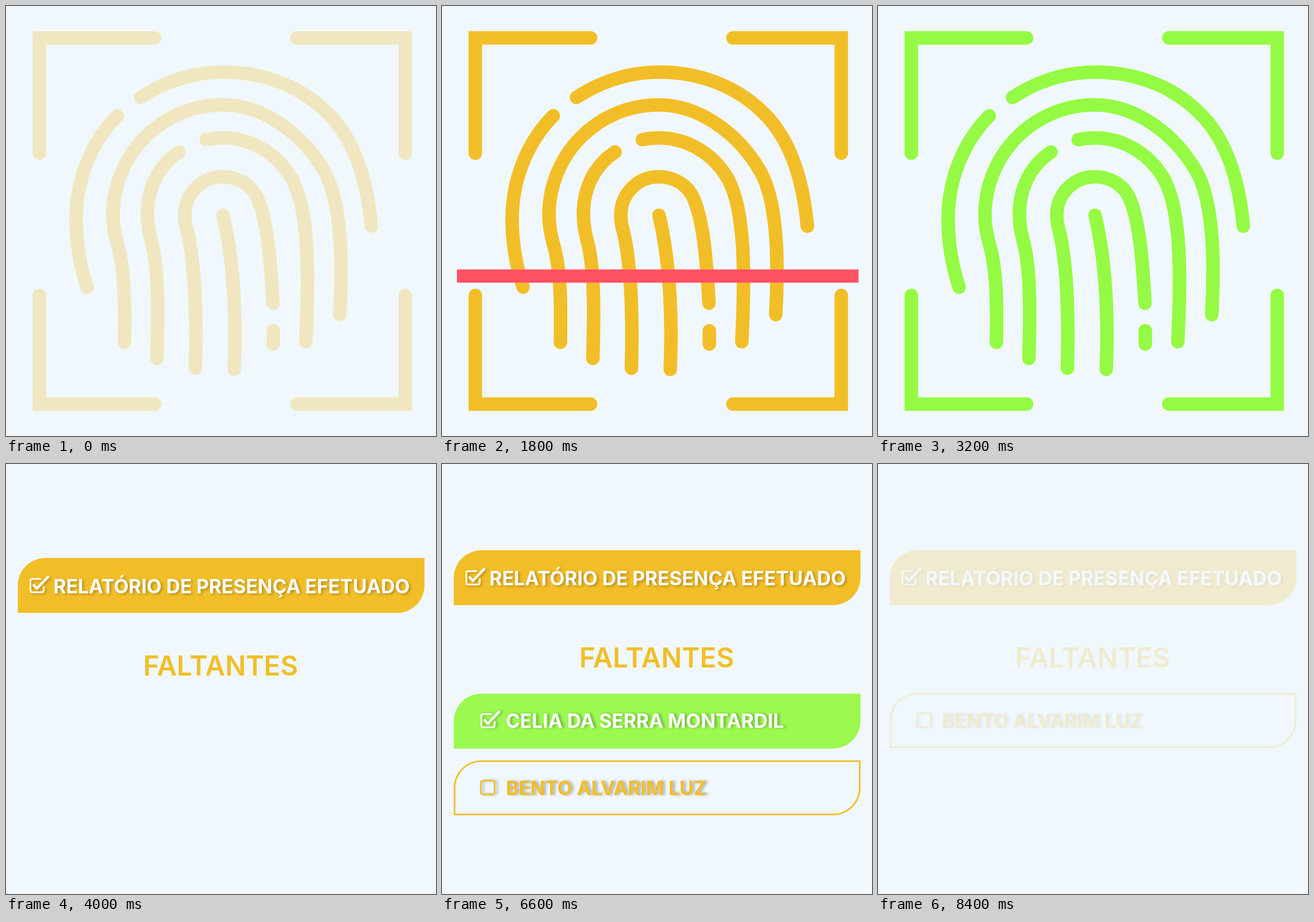
Write an HTML page that moves like this. It is 748 by 748 pixels and loops after 8600 ms.

```html
<!DOCTYPE html>
<html lang="pt">
<head>
<meta charset="utf-8">
<title>Presença</title>
<style>
  html, body { margin: 0; width: 100%; height: 100%; overflow: hidden; background: #f0f8fe; }
  svg { display: block; width: 100vw; height: 100vh; }
  text { font-family: Inter, "Liberation Sans", sans-serif; font-weight: 700; font-size: 33.6px; }
  #title { font-weight: 600; font-size: 47.5px; }
  #print { fill: none; stroke-width: 23.5; stroke-linecap: round; }
  .gold { fill: #f2be28; }
  .line { fill: none; stroke: #f2be28; stroke-width: 2.8; }
  .white { fill: #fff; }
  .icon { fill: none; stroke: #fff; stroke-width: 2.8; }
  .check { stroke-width: 4.2; }
  .headShade { filter: drop-shadow(3px 2px 2px rgba(0, 0, 0, .25)); }
  .shade { filter: drop-shadow(4px 0 2px rgba(0, 0, 0, .28)); }
</style>
</head>
<body>
<svg viewBox="0 0 748 748">
  <defs>
    <path id="panel" d="M20.5 95.5V48A48 48 0 0 1 68.5 0H728V47.5A48 48 0 0 1 680 95.5Z"/>
    <path id="frame" d="M21.9 94.1V48A46.6 46.6 0 0 1 68.5 1.4H726.6V47.5A46.6 46.6 0 0 1 680 94.1Z"/>
    <rect id="empty" x="1.4" y="1.4" width="24" height="24" rx="3.5"/>
    <g id="ticked">
      <path d="M20 1.4H5Q1.4 1.4 1.4 5V21Q1.4 24.6 5 24.6H21Q24.6 24.6 24.6 21V14"/>
      <path class="check" d="M6 11L13 18L33.5-3.5"/>
    </g>
  </defs>

  <g id="print">
    <!-- corners -->
    <path d="M58 256V55.5H258.5M506 55.5H694.5V256M58 503.5V692.5H258.5M506 692.5H694.5V503.5"/>
    <!-- ridges -->
    <path d="M234 159C277 131 326 115 378 115C455 115 521 144 567 194C606 237 628 300 635.5 383"/>
    <path d="M193.5 191C147 238 122 304 122 371C122 412 129 452 141 489"/>
    <path d="M206 585C207 520 207 460 194 415C189 397 186 382 186 364C186 258 271 172 377 172C448 172 516 222 554 288C583 340 586 437 580.5 537"/>
    <path d="M301 254C266 277 246 316 246 362C246 380 249 396 253 410C266 458 264.5 540 262.5 613"/>
    <path d="M348.5 232.5C358 230.5 367 229.5 377 229.5C427 229.5 472 257 497 300C526 352 528 455 521.5 584"/>
    <path d="M329.5 630C331.5 550 331 455 315 390C312 381 311 373 311 364C311 327 340 297 377 297C405 297 429 312 439 338C455 378 460 440 464.5 517"/>
    <path d="M377.5 364C396 440 401 540 397 632M465 565V588"/>
  </g>
  <rect id="bar" x="26" y="-11.5" width="698.5" height="23" fill="#ff5263"/>

  <g id="report">
    <g id="head">
      <use href="#panel" class="gold" y="150"/>
      <g class="headShade">
        <use href="#ticked" class="icon" x="41" y="185"/>
        <text class="white" x="392.5" y="211" text-anchor="middle">RELATÓRIO DE PRESENÇA EFETUADO</text>
      </g>
      <text id="title" class="gold" x="373.5" y="354" text-anchor="middle">FALTANTES</text>
    </g>
    <g id="first">
      <g id="absent">
        <use href="#frame" class="line"/>
        <g class="shade">
          <use href="#empty" class="line" x="67" y="34"/>
          <text class="gold" x="111" y="59">CELIA DA SERRA MONTARDIL</text>
        </g>
      </g>
      <g id="present">
        <use href="#panel" fill="#95fa43"/>
        <g class="shade">
          <use href="#ticked" class="icon" x="67" y="34"/>
          <text class="white" x="111" y="59">CELIA DA SERRA MONTARDIL</text>
        </g>
      </g>
    </g>
    <g id="second">
      <use href="#frame" class="line"/>
      <g class="shade">
        <use href="#empty" class="line" x="66" y="34"/>
        <text class="gold" x="111" y="60.5">BENTO ALVARIM LUZ</text>
      </g>
    </g>
  </g>
</svg>
<script>
  const LOOP = 8600, STEP = 200;
  const GOLD = [242, 190, 40], GREEN = [149, 250, 67];
  const el = id => document.getElementById(id);

  const ramp = (t, from, to) => Math.min(1, Math.max(0, (t - from) / (to - from)));
  const smooth = (t, from, to) => {
    const p = ramp(t, from, to);
    return p * p * (3 - 2 * p);
  };
  // Distance still to go on an ease-out slide
  const slide = (t, from, to, dist) => dist * (1 - ramp(t, from, to)) ** 2;
  const mix = (a, b, p) => a + (b - a) * p;

  const fade = (id, v) => { el(id).style.opacity = v; };
  const move = (id, y) => el(id).setAttribute("transform", `translate(0 ${y})`);

  function draw(now) {
    const t = Math.floor(now % LOOP / STEP) * STEP;

    // Scan
    const valid = smooth(t, 2200, 3000);
    el("print").style.stroke = `rgb(${GOLD.map((c, i) => Math.round(mix(c, GREEN[i], valid)))})`;
    fade("print", ramp(t, -200, 500) - ramp(t, 3200, 3600));
    fade("bar", t > 680 && t < 2400 ? 1 : 0);
    move("bar", mix(55, 692, ramp(t, 680, 2400)));

    // Report
    fade("report", ramp(t, 3600, 4000) - ramp(t, 7800, 8570));
    move("head", slide(t, 3600, 4050, 1097));
    move("first", 399.5 + slide(t, 4400, 5080, 350));
    move("second", mix(515.5, 398.5, smooth(t, 6600, 7600)) + slide(t, 4600, 5200, 282));

    // First person turns present, then leaves the list
    const present = smooth(t, 5600, 6800);
    fade("absent", 1 - present);
    fade("present", present);
    fade("first", 1 - ramp(t, 6600, 7400));
  }

  const start = performance.now();
  function tick() {
    draw(performance.now() - start);
    requestAnimationFrame(tick);
  }
  tick();
</script>
</body>
</html>
```
